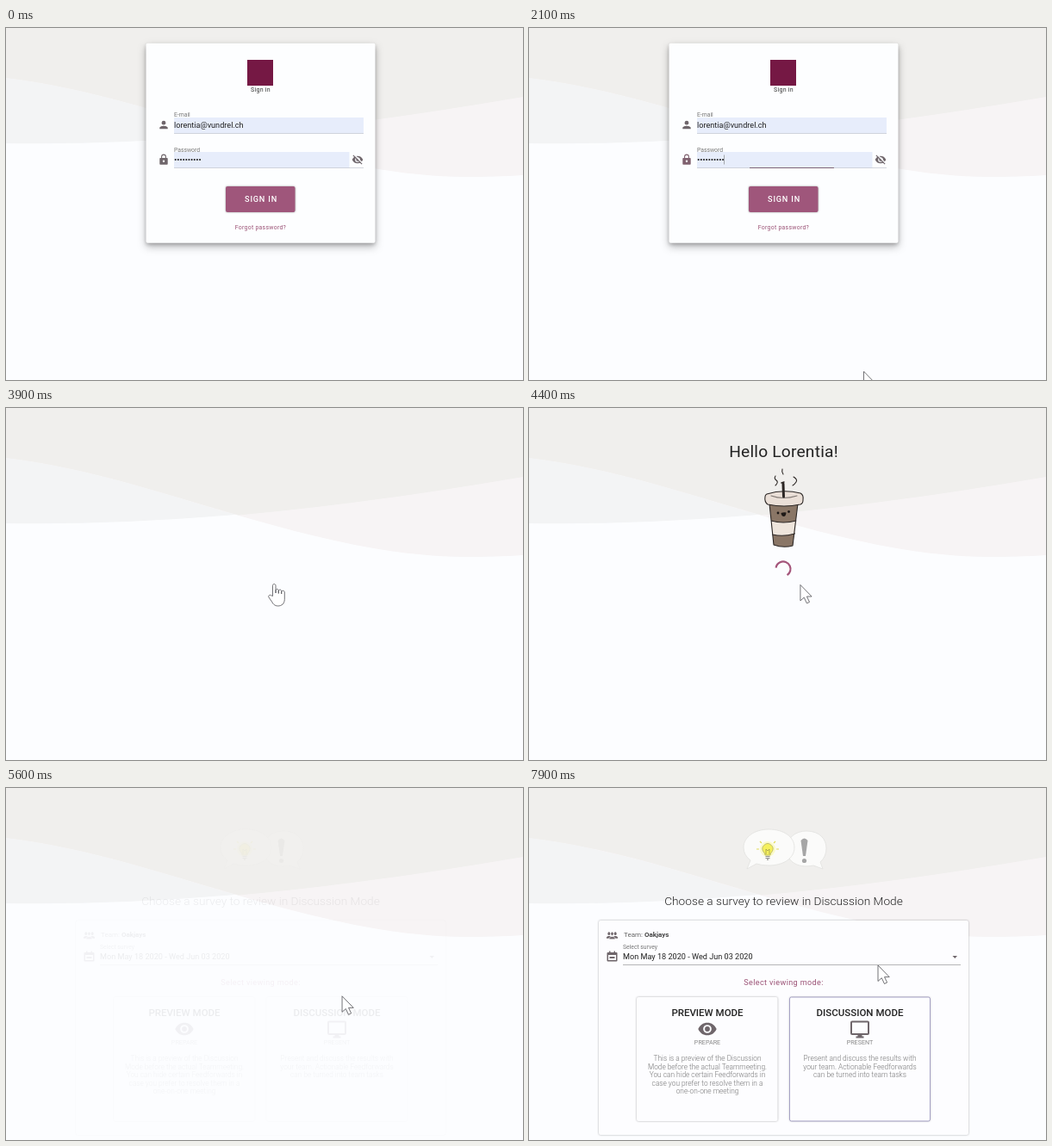
An HTML page for the animation above (8 s loop, 600x409 px).

```html
<!DOCTYPE html>
<html lang="en">
<head>
<meta charset="utf-8">
<title>Sign in to discussion mode</title>
<style>
  html, body { margin: 0; width: 100%; height: 100%; overflow: hidden; background: #fcfdff; }
  svg { display: block; width: 100vw; height: 100vh; font-family: Roboto, Arial, sans-serif; }
  .mid { text-anchor: middle; }
  .label { font-size: 6.8px; fill: #777; }
  .value { font-size: 9.15px; fill: #222; }
  .link { fill: #9b5276; }
  .heading { font-size: 11.5px; font-weight: 500; fill: #222; }
  .caption { font-size: 7.2px; fill: #888; }
  .body { font-size: 8.3px; font-weight: 300; fill: #777; }
  .icon { fill: #6f666b; }
  .panel { fill: #fdfeff; filter: drop-shadow(0 2px 2px #0003) drop-shadow(0 4px 5px #0004); }
  .sheet { fill: #fdfdff; filter: drop-shadow(0 .7px 1.3px #0005); }
  .ink { fill: none; stroke: #2b2624; stroke-width: 1.1; stroke-linecap: round; stroke-linejoin: round; }
  .pointer { fill: #fff; stroke: #505055; stroke-width: .8; stroke-linejoin: round; }
</style>
</head>
<body>
<svg viewBox="0 0 600 409" preserveAspectRatio="none">
  <defs>
    <clipPath id="buttonClip"><rect x="255" y="184" width="80.500" height="30" rx="2"/></clipPath>
    <path id="eye" fill-rule="evenodd" d="M-11 0C-9 -4.8 -5 -7.5 0 -7.5S9 -4.8 11 0C9 4.8 5 7.5 0 7.5S-9 4.8 -11 0ZM-5 0A5 5 0 0 0 5 0A5 5 0 0 0 -5 0ZM-3 0A3 3 0 0 1 3 0A3 3 0 0 1 -3 0Z"/>
    <g id="person"><circle cy="-4" r="4"/><path d="M-8 8V6C-8 3.3 -2.7 2 0 2S8 3.3 8 6V8Z"/></g>
  </defs>

  <rect width="600" height="409" fill="#fcfdff"/>
  <path fill="#f3f4f5" d="M0 0V134Q265 138 600 80V0Z"/>
  <path fill="#f7f4f5" d="M0 0V58C100 70 190 102 270 125S440 172 530 173Q570 173 600 171V0Z"/>
  <path fill="#f0efed" d="M0 0V58C100 70 190 102 270 124.5Q420 111 600 80V0Z"/>

  <g id="login">
    <rect class="panel" x="162.500" y="17.800" width="266" height="232" rx="2"/>
    <rect x="280" y="37" width="30" height="30" fill="#751844"/>
    <text class="mid" x="295.5" y="74" font-size="7" letter-spacing=".3" fill="#333">Sign in</text>

    <rect x="195" y="104" width="220" height="18.5" fill="#e7edfb"/>
    <rect x="195" y="144" width="203.500" height="18.5" fill="#e7edfb"/>
    <path d="M195 122.500H415M195 162.500H415" stroke="#b9bdc6" stroke-width=".6"/>
    <text class="label" x="195" y="103">E-mail</text>
    <text class="value" x="195" y="116">lorentia@vundrel.ch</text>
    <text class="label" x="195" y="143.500">Password</text>
    <path d="M196.700 153H225.500" stroke="#222" stroke-width="2.1" stroke-linecap="round" stroke-dasharray="0 3.150"/>
    <rect id="caret" x="226" y="147.500" width=".6" height="11" fill="#777"/>
    <rect id="focusLine" y="162.100" height=".9" fill="#75596a"/>

    <use class="icon" href="#person" transform="translate(183 112.500) scale(.59)"/>
    <g id="lock" class="icon">
      <path fill-rule="evenodd" d="M179 151H187Q187.700 151 187.700 152V157.800Q187.700 158.700 187 158.700H179Q178.300 158.700 178.300 157.800V152Q178.300 151 179 151ZM181.800 154.800A1.200 1.200 0 0 0 184.200 154.800A1.200 1.200 0 0 0 181.800 154.800Z"/>
      <path id="shackle" d="M180.600 151V149.500A2.400 2.400 0 0 1 185.400 149.500V151" fill="none" stroke="#6f666b" stroke-width="1.1"/>
    </g>
    <g transform="translate(408 153) scale(.57)">
      <use class="icon" href="#eye"/>
      <path d="M-7 -10L10 7" stroke="#fdfeff" stroke-width="2.500"/>
      <path d="M-9 -9L9 9" stroke="#6f666b" stroke-width="2"/>
    </g>

    <rect x="255" y="184" width="80.500" height="30" rx="2" fill="#9f567b" style="filter:drop-shadow(0 .8px 1px #0006)"/>
    <g clip-path="url(#buttonClip)" fill="#fff">
      <rect id="buttonHover" x="255" y="184" width="81" height="30"/>
      <circle id="ripple"/>
    </g>
    <text class="mid" x="296" y="202.200" font-size="9.200" font-weight="500" letter-spacing=".8" fill="#fff">SIGN IN</text>
    <text class="mid link" x="295.500" y="234.300" font-size="6.900" letter-spacing=".27">Forgot password?</text>
  </g>

  <g id="hello">
    <text class="mid" x="295.500" y="57" font-size="19.200" letter-spacing=".2" fill="#222">Hello Lorentia!</text>
    <path fill="#8a7666" d="M279 111L284 159Q295 163 306 160L312 111Z"/>
    <path fill="#eee5dc" d="M281 131Q295 135 310 131L308.500 146Q295 150 282.500 147Z"/>
    <path class="ink" d="M279 111L284 159Q295 163 306 160L312 111M281 131Q295 135 310 131M282.500 147Q295 150 308.500 146"/>
    <path class="ink" style="fill:#eadfd7" d="M276 100Q295 94 315 99Q319 101 318 107Q318 111 315 112Q296 116 277 112Q273 109 274 103Q274 101 276 100Z"/>
    <path class="ink" d="M281 102Q295 107 311 102" stroke-opacity=".55"/>
    <path class="ink" d="M295 88L295.500 103" style="stroke-width:3"/>
    <path class="ink" d="M293 87L296 86" style="stroke-width:1.500"/>
    <path class="ink" d="M286 79Q284 82 287 84T286 90M294 71Q293 74 295 77M307 80Q312 83 310 86T306 90"/>
    <g fill="#1e1917"><circle cx="289" cy="122" r="1.400"/><circle cx="301.500" cy="120.500" r="1.400"/><path d="M292.500 122Q295.500 121 298.500 121.500Q298 126 295.700 126Q293 126 292.500 122Z"/></g>
    <circle id="spinner" cx="295" cy="187" r="8.500" fill="none" stroke="#a4557b" stroke-width="2.200" pathLength="125.660"/>
  </g>

  <g id="survey">
    <g fill="#fbfbfa" stroke="#e1e1df" stroke-width=".8">
      <path d="M322 50C337 50 345 59 345 70Q345 80 338 86L341 94L330 90C310 94 299 84 299 71C299 58 309 50 322 50Z"/>
      <path d="M278 48C296 48 308 57 308 69C308 82 295 90 278 90Q270 90 264 88L253 94L257 84Q249 78 249 69C249 57 262 48 278 48Z"/>
    </g>
    <circle cx="277" cy="71" r="9" fill="#fbf9b8" opacity=".75"/>
    <path d="M264 71H267M287 71H290M268 62L270 64M284 64L286 62" stroke="#e2dc58" stroke-width="1.200"/>
    <path d="M274 78Q274 76 272 74A6 6 0 1 1 282 74Q280 76 280 78Z" fill="#f5f05d" stroke="#a9a95d" stroke-width=".7"/>
    <path d="M275 77V71L277 73L279 71V77" fill="none" stroke="#96914d" stroke-width=".7"/>
    <path d="M274.500 79.500H279.500M274.500 81.500H279.500M276 83.200H278" stroke="#8c8c88" stroke-width="1.200"/>
    <path d="M315.500 61Q319.500 56 323.500 61L321 79H318Z" fill="#a6a6a6"/>
    <circle cx="319.500" cy="84.500" r="2.600" fill="#a6a6a6"/>

    <text class="mid" x="295.500" y="136.200" font-size="13.700" font-weight="300" fill="#222">Choose a survey to review in Discussion Mode</text>
    <rect class="sheet" x="81" y="154" width="429" height="249" rx="2"/>

    <g class="icon">
      <use href="#person" transform="translate(92.800 171) scale(.36 .46)"/>
      <use href="#person" transform="translate(100.200 171) scale(.36 .46)"/>
      <use href="#person" transform="translate(96.500 171.500) scale(.43 .54)" stroke="#fdfdff" stroke-width="1.300"/>
      <path fill-rule="evenodd" d="M91.500 191H93V189.500H94.500V191H98.500V189.500H100V191H101.500Q102.500 191 102.500 192V200.500Q102.500 201.500 101.500 201.500H91.500Q90.500 201.500 90.500 200.500V192Q90.500 191 91.500 191ZM92 194V200H101V194Z"/>
      <path d="M93.500 196H99.500V198H93.500ZM491.500 195H497L494.250 198Z"/>
    </g>
    <text x="110" y="173" font-size="8" fill="#666">Team: <tspan font-weight="700" fill="#444">Oakjays</tspan></text>
    <text class="label" x="109" y="186.500">Select survey</text>
    <text class="value" x="109" y="199.200">Mon May 18 2020 - Wed Jun 03 2020</text>
    <path d="M109 205.500H501" stroke="#999" stroke-width=".7"/>
    <text class="mid link" x="295.500" y="229" font-size="9.100" letter-spacing=".35">Select viewing mode:</text>

    <rect class="sheet" x="125" y="243" width="163.500" height="144" rx="2"/>
    <text class="mid heading" x="207" y="265.300">PREVIEW MODE</text>
    <use class="icon" href="#eye" transform="translate(207 280) scale(.97)"/>
    <text class="mid caption" x="207" y="298.300">PREPARE</text>
    <g id="previewText"></g>

    <rect class="sheet" x="302.500" y="243" width="163" height="144" rx="2"/>
    <rect id="cardHover" x="302.500" y="243" width="163" height="144" rx="2" fill="#ebebf4"/>
    <rect id="cardBorder" x="302.500" y="243" width="163" height="144" rx="2" fill="none" stroke="#a6a2c5" stroke-width="1"/>
    <text class="mid heading" x="384" y="265.300">DISCUSSION MODE</text>
    <path d="M375 271.500H393Q394 271.500 394 272.500V285Q394 286 393 286H375Q374 286 374 285V272.500Q374 271.500 375 271.500Z" fill="none" stroke="#6f666b" stroke-width="2"/>
    <path class="icon" d="M381.500 286H386.500V288.500H388.500V290.500H379.500V288.500H381.500Z"/>
    <text class="mid caption" x="384" y="298.300">PRESENT</text>
    <g id="discussionText"></g>
  </g>

  <g id="cursor">
    <path id="arrow" class="pointer" d="M0 0V18.500L4.300 14.700L7.500 21.500L10.600 20L7.500 13.600H13.200Z"/>
    <path id="hand" class="pointer" d="M-1.500 14V2C-1.500 -.6 2 -.6 2 2V10.500V7.500C2.500 5.300 5 5.500 5.300 7.500V11V8C6 6 8.500 6.300 8.700 8.300V11.500V9C9.500 7 12 7.500 12.300 9.500V18C12 23 9 25.500 4.500 25.500C1 25.500 -1 23.500 -2.500 20.500L-6 15.500C-7 13.500 -4.800 12 -3.300 13.300Z"/>
  </g>
</svg>

<script>
const LOOP = 8000;
const $ = id => document.getElementById(id);
const set = (id, attrs) => {
  for (const name in attrs) $(id).setAttribute(name, attrs[name]);
};
const show = (id, opacity) => {
  $(id).style.opacity = opacity;
  $(id).style.display = opacity > 0 ? '' : 'none';
};
const clamp = v => Math.max(0, Math.min(1, v));
const smooth = v => v * v * (3 - 2 * v);
const easeOut = v => 1 - (1 - v) ** 3;
const span = (t, from, to) => clamp((t - from) / (to - from));

// Value at time t from rows of [time, ...values]
function track(rows, t, column = 1) {
  const next = rows.findIndex(row => row[0] > t);
  if (next === 0) return rows[0][column];
  if (next < 0) return rows[rows.length - 1][column];
  const a = rows[next - 1], b = rows[next];
  return a[column] + (b[column] - a[column]) * smooth(span(t, a[0], b[0]));
}

const cursorPath = [
  [2100, 388.500, 399], [2900, 311, 204.500], [4300, 311, 204.500],
  [4900, 363, 217], [5400, 374, 228], [5950, 427, 273.500], [6150, 427, 273.500],
  [6500, 506, 262], [7200, 506, 262], [7500, 440, 278], [7900, 405, 206]
];
const cardHover = [
  [5850, 0], [6050, 1], [6250, 1], [6450, 0],
  [7250, 0], [7450, 1], [7700, 1], [7880, 0]
];

function addLines(id, x, lines) {
  lines.forEach((line, i) => {
    const text = document.createElementNS('http://www.w3.org/2000/svg', 'text');
    text.setAttribute('class', 'mid body');
    text.setAttribute('x', x);
    text.setAttribute('y', 317 + i * 9.6);
    text.textContent = line;
    $(id).append(text);
  });
}
addLines('previewText', 207, [
  'This is a preview of the Discussion', 'Mode before the actual Teammeeting.',
  'You can hide certain Feedforwards in', 'case you prefer to resolve them in a',
  'one-on-one meeting'
]);
addLines('discussionText', 384, [
  'Present and discuss the results with', 'your team. Actionable Feedforwards',
  'can be turned into team tasks'
]);

function drawLogin(t) {
  show('login', t < 3900 ? 1 : 0);
  const focused = t >= 2050 && t < 3230;
  const width = 220 * (easeOut(span(t, 2047, 2350)) - easeOut(span(t, 3265, 3565)));
  set('focusLine', { x: 305 - width / 2, width });
  show('caret', focused && (t - 2050) % 1000 < 500 ? 1 : 0);
  const lockColor = focused ? '#80616f' : '#6f666b';
  $('lock').style.fill = lockColor;
  set('shackle', { stroke: lockColor });
  show('buttonHover', .08 * span(t, 2800, 3000));
  const grow = span(t, 3250, 3550), drift = Math.sqrt(grow);
  set('ripple', { cx: 313 - 17.5 * drift, cy: 206 - 7 * drift, r: 72 * smooth(grow) });
  show('ripple', .27 * span(t, 3250, 3320) * (1 - span(t, 3550, 3850)));
}

function drawHello(t) {
  show('hello', span(t, 3920, 4120) * (1 - span(t, 5400, 5550)));
  const p = ((t - 3906 + 1400 * 3) % 1400) / 1400;
  const first = smooth(clamp(p * 2)), second = smooth(clamp(p * 2 - 1));
  const start = 15 * first + 109 * second;
  const length = Math.min(1 + 99 * first, 125.66 - start);
  set('spinner', {
    'stroke-dasharray': `${length} 200`,
    'stroke-dashoffset': -start,
    transform: `rotate(${28 + 360 * p} 295 187)`
  });
}

function drawSurvey(t) {
  show('survey', smooth(span(t, 5540, 5900)));
  show('cardHover', track(cardHover, t));
  show('cardBorder', span(t, 5850, 6050));
}

function drawCursor(t) {
  const x = track(cursorPath, t), y = track(cursorPath, t, 2);
  const overButton = t < 4350 && y < 214;
  const overCard = t > 5600 && x > 302 && x < 466 && y > 243;
  const pointing = overButton || overCard;
  show('cursor', t >= 2100 ? 1 : 0);
  set('cursor', { transform: `translate(${x} ${y})` });
  show('hand', pointing ? 1 : 0);
  show('arrow', pointing ? 0 : 1);
}

const origin = performance.now();
function render() {
  const t = (performance.now() - origin) % LOOP;
  drawLogin(t);
  drawHello(t);
  drawSurvey(t);
  drawCursor(t);
  requestAnimationFrame(render);
}
render();
</script>
</body>
</html>
```
